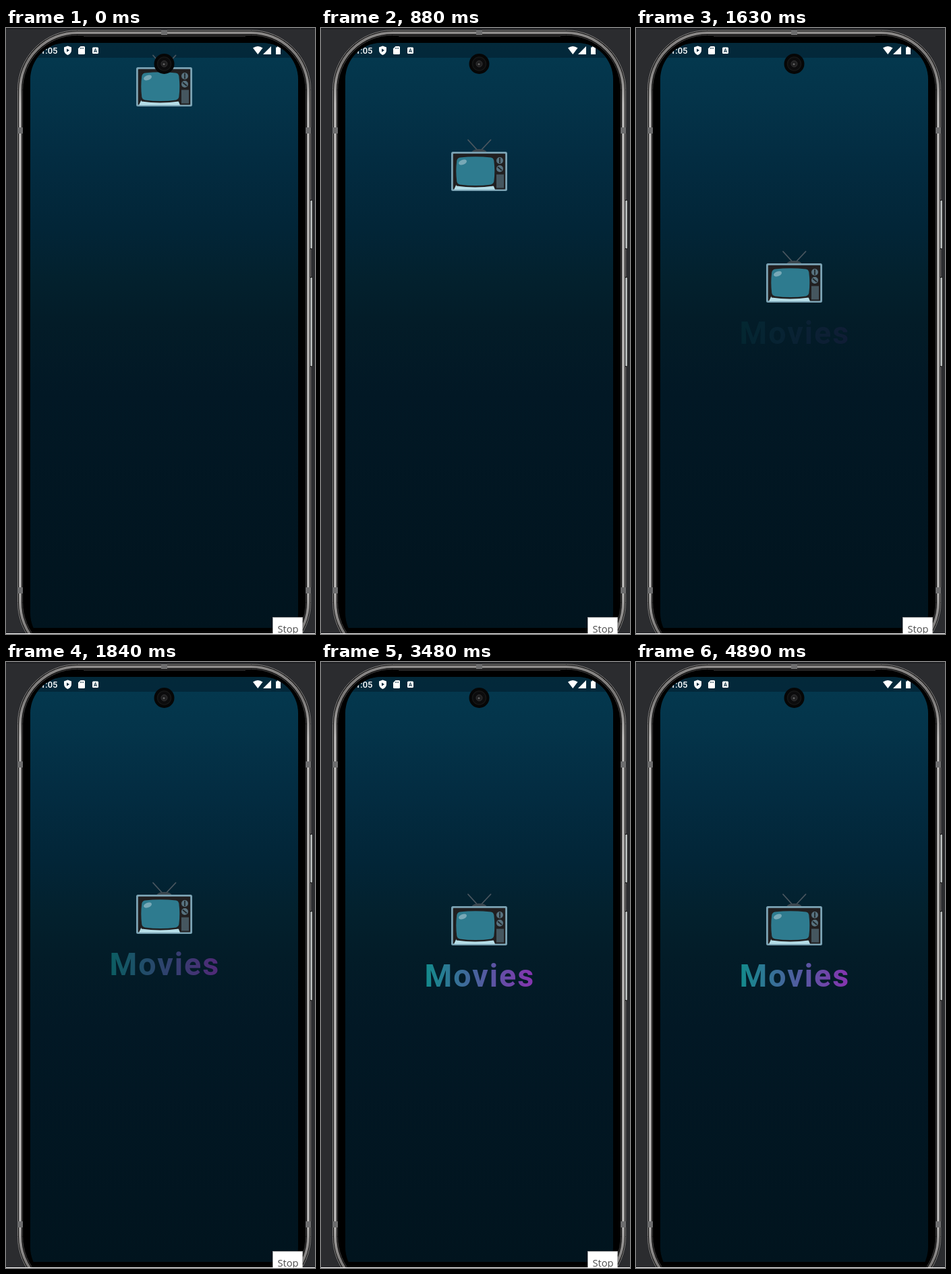
These frames come from a looping animation (458 px wide and 896 px high, 4.96 s). An HTML page:

```html
<!DOCTYPE html>
<html lang="en">
<head>
<meta charset="utf-8">
<title>Splash screen</title>
<style>
  html, body { margin: 0; width: 100%; height: 100%; overflow: hidden; background: #2b2c2f; }
  svg { display: block; width: 458px; height: 896px; }
  .title { font: 700 46.5px Roboto, sans-serif; letter-spacing: 2px; }
  .clock { font: 500 13px Roboto, sans-serif; }
  .tip { font: 14.7px "Open Sans", sans-serif; }
</style>
</head>
<body>
<svg viewBox="0 0 458 896">
  <defs>
    <linearGradient id="sky" gradientUnits="userSpaceOnUse" x1="0" y1="22" x2="0" y2="887">
      <stop offset="0" stop-color="#04394f"/>
      <stop offset=".09" stop-color="#04344a"/>
      <stop offset=".2" stop-color="#032c41"/>
      <stop offset=".32" stop-color="#022537"/>
      <stop offset=".4" stop-color="#03212e"/>
      <stop offset=".48" stop-color="#031c28"/>
      <stop offset=".6" stop-color="#021825"/>
      <stop offset="1" stop-color="#01141e"/>
    </linearGradient>
    <linearGradient id="metal" gradientUnits="userSpaceOnUse" x1="0" y1="5" x2="0" y2="896">
      <stop offset="0" stop-color="#8a8887"/>
      <stop offset=".05" stop-color="#777574"/>
      <stop offset=".12" stop-color="#b0aead"/>
      <stop offset=".92" stop-color="#b0aead"/>
      <stop offset="1" stop-color="#777574"/>
    </linearGradient>
    <linearGradient id="ink" gradientUnits="userSpaceOnUse" x1="156" y1="0" x2="314" y2="0">
      <stop offset="0" stop-color="#148a8c"/>
      <stop offset="1" stop-color="#8634b0"/>
    </linearGradient>
    <clipPath id="glass"><rect x="36" y="22" width="397" height="897" rx="54"/></clipPath>
  </defs>

  <rect width="458" height="896" fill="#2b2c2f"/>
  <rect width="458" height="2" fill="#1f2023"/>

  <!-- metal frame -->
  <g fill="none">
    <rect x="17.5" y="3.5" width="434" height="934" rx="88" fill="#000" stroke="#8d8b8a"/>
    <rect x="21" y="7" width="427" height="927" rx="84.5" stroke="url(#metal)" stroke-width="4"/>
    <rect x="24.5" y="10.5" width="420" height="920" rx="81" stroke="#4b4949"/>
    <path d="M115 12.5H355" stroke="#3b3939"/>
  </g>
  <g fill="#6d6d6e">
    <rect x="230" y="3" width="9" height="7"/>
    <rect x="17" y="147" width="8" height="9"/>
    <rect x="444" y="147" width="8" height="9"/>
    <rect x="17" y="827" width="8" height="9"/>
    <rect x="444" y="827" width="8" height="9"/>
  </g>

  <!-- side buttons -->
  <g fill="#b0b4b4" stroke="#161616">
    <rect x="450.5" y="254.5" width="4" height="72" rx="1.5"/>
    <rect x="450.5" y="368.5" width="4" height="132" rx="1.5"/>
  </g>

  <g clip-path="url(#glass)">
    <rect x="36" y="22" width="397" height="865" fill="url(#sky)"/>
    <rect x="36" y="22" width="397" height="22" fill="#021c2b" opacity=".55"/>

    <!-- status bar -->
    <g fill="#fff">
      <text class="clock" x="76.5" y="38" text-anchor="end">1:05</text>
      <path d="M91.5 26.5l5.5 2v4.5q0 4.500-5.500 7q-5.500-2.500-5.500-7v-4.500z"/>
      <path d="M110.5 27h5q1.500 0 1.500 1.500v9q0 1.500-1.500 1.500h-7q-1.500 0-1.500-1.500v-7z"/>
      <rect x="128" y="28.5" width="9" height="9.5" rx="1.5"/>
      <path d="M366 29.5q7.300-5 14.500 0l-7.250 9.500z"/>
      <path d="M393 27v12h-12z"/>
      <path d="M400 28.5h2v-1.500h3v1.500h2v10.500h-7z"/>
    </g>
    <g fill="none" stroke="#062c3f">
      <path d="M90 30.500l4 2.500l-4 2.500z" fill="#062c3f" stroke="none"/>
      <path d="M110.500 29v2M112.500 29v2M114.500 29v2" stroke-width=".8"/>
      <path d="M130.500 36l2-5.500l2 5.500M131 34.500h3"/>
    </g>

    <g id="column">
      <!-- television -->
      <path d="M218 343.5L233 360M251.5 343.5L236 360" fill="none" stroke="#4a565f" stroke-width="1.8" stroke-linecap="round"/>
      <path d="M223 362q2-5 11.500-5t11.500 5z" fill="#3c4850"/>
      <rect x="193" y="361" width="83" height="58" rx="2.5" fill="#7ba3b4"/>
      <rect x="195.8" y="363.8" width="77.4" height="52.800" rx="1" fill="#211f20"/>
      <path d="M200.500 409.500h54.500l3 7.500h-61z" fill="#b5dde7"/>
      <path d="M198 404h61l-3 7.500q-27.500 4-55 0z" fill="#211f20"/>
      <path d="M206 369.500q23-2.500 46 0q3.500.5 4.300 4.500q2 15.500 0 31q-.7 3.500-4.300 4.500q-23 3-46 0q-4-1-4.700-4.500q-2-15.500 0-31q1-4 4.700-4.500z" fill="#2e7b8f"/>
      <ellipse cx="210" cy="376.500" rx="6.300" ry="3.600" transform="rotate(-22 210 376.500)" fill="#78a9b7"/>
      <g fill="#58727f">
        <circle cx="265" cy="374" r="5"/>
        <circle cx="265" cy="386" r="5"/>
        <rect x="260" y="394.500" width="11" height="20" fill="#45565f"/>
      </g>
      <path d="M265 370v8M262 383.500l6 5" stroke="#21282c" stroke-width="1.800"/>
      <text id="title" class="title" x="153.500" y="480" fill="url(#ink)">Movies</text>
    </g>
  </g>

  <!-- camera -->
  <circle cx="234.5" cy="53" r="15" fill="#060606"/>
  <circle cx="234.5" cy="53" r="10" fill="#0c0c0d" stroke="#161717" stroke-width="1.5"/>
  <circle cx="234.5" cy="53" r="4.5" fill="#1f1f20" stroke="#343435"/>
  <circle cx="234" cy="53.5" r="1.5" fill="#606060"/>

  <g id="tip">
    <rect x="395.5" y="871.5" width="44" height="30" fill="#fff" stroke="#a9a9a9"/>
    <text class="tip" x="402.5" y="894" fill="#4c4c4c">Stop</text>
  </g>
  <rect y="895" width="458" height="1" fill="#fff"/>
</svg>
<script>
  const LOOP = 4960, FIRST = 600, STEP = 68.75, DROP = 303;
  const column = document.getElementById("column");
  const title = document.getElementById("title");
  const tip = document.getElementById("tip");

  function bounceOut(x) {
    if (x >= 1) return 1;
    const arc = (center, floor) => 7.5625 * (x - center / 2.75) ** 2 + floor;
    if (x < 1 / 2.75) return arc(0, 0);
    if (x < 2 / 2.75) return arc(1.5, 0.75);
    if (x < 2.5 / 2.75) return arc(2.25, 0.9375);
    return arc(2.625, 0.984375);
  }

  // Critically damped spring, stiffness 50.
  function spring(ms) {
    const p = Math.sqrt(50) * Math.max(0, ms) / 1000;
    return 1 - (1 + p) * Math.exp(-p);
  }

  function tipOpacity(t) {
    if (t < 4760) return 1;
    if (t < 4820) return 0.67;
    return t < 4890 ? 0.33 : 0;
  }

  function draw(t) {
    // The picture advances in fixed steps, with a short stall before the title appears.
    const shown = FIRST + STEP * Math.floor((t - FIRST + 2) / STEP);
    const stall = shown > 1500 ? 22 : 0;
    const fall = t < 610 ? 0 : bounceOut((shown - 516 - stall) / 1538);
    column.setAttribute("transform", `translate(0 ${Math.round(DROP * (fall - 1))})`);
    title.setAttribute("opacity", spring(shown - 1556).toFixed(4));
    tip.setAttribute("opacity", tipOpacity(t));
  }

  const start = performance.now();
  function tick() {
    draw((performance.now() - start) % LOOP);
    requestAnimationFrame(tick);
  }
  tick();
</script>
</body>
</html>
```
